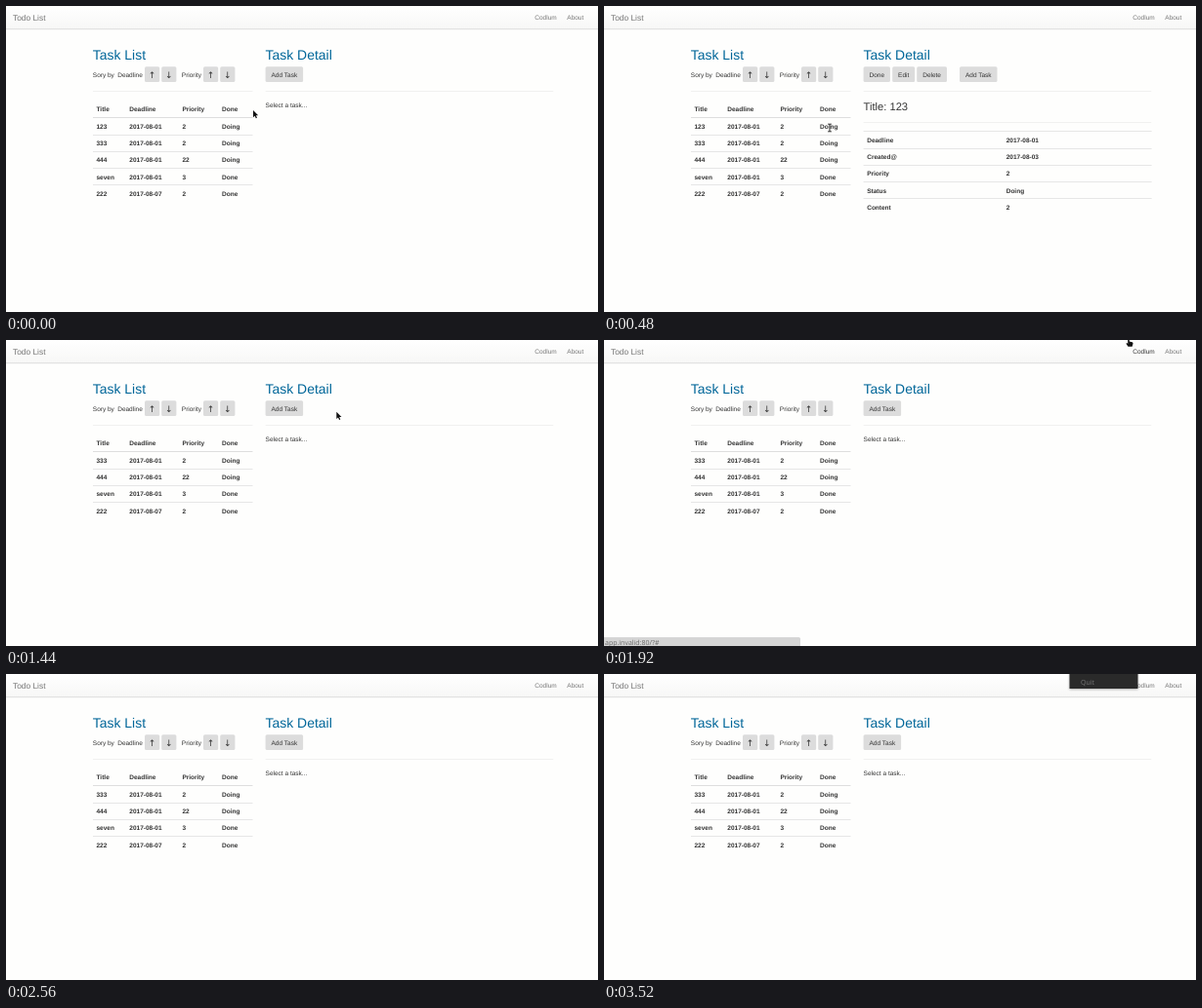
An HTML page that plays this animation: 606 by 314 pixels, repeating every 3.68 s.

```html
<!DOCTYPE html>
<html lang="en">
<head>
<meta charset="utf-8">
<title>Todo List</title>
<style>
  html, body { margin: 0; width: 100%; height: 100%; overflow: hidden; background: #fefefd; }
  svg { display: block; width: 606px; height: 314px; }
  text { font: 6.51px "Liberation Sans", Arial, sans-serif; fill: #333; text-rendering: geometricPrecision; }
  .bold { font-weight: bold; }
  .h2 { font-size: 13.95px; fill: #069; }
  .h3 { font-size: 11.16px; }
  .brand { font-size: 8.37px; fill: #777; }
  .nav { fill: #777; }
  .nav.hover { fill: #333; }
  .button { text-anchor: middle; }
  .arrow { text-anchor: middle; font: 9px "DejaVu Sans", sans-serif; }
  .status { font: 7px "Open Sans", sans-serif; fill: #666; }
  .quit { font: 7px "Open Sans", sans-serif; }
  .cursor { fill: #111; stroke: #fff; stroke-width: .7; stroke-linejoin: round; paint-order: stroke; }
</style>
</head>
<body>
<svg viewBox="0 0 606 314" xmlns="http://www.w3.org/2000/svg">
  <defs>
    <linearGradient id="bar" x2="0" y2="1">
      <stop stop-color="#fff"/><stop offset="1" stop-color="#f7f7f6"/>
    </linearGradient>
    <linearGradient id="press" x2="0" y2="1">
      <stop stop-color="#bdbdbd"/><stop offset=".3" stop-color="#d3d3d3"/>
    </linearGradient>
    <filter id="shadow" x="-20%" y="-20%" width="140%" height="160%">
      <feDropShadow dx="0" dy="1" stdDeviation="1.2" flood-opacity=".3"/>
    </filter>
  </defs>
  <g id="page"></g>
  <g id="listBefore"></g>
  <g id="listAfter"></g>
  <g id="empty"></g>
  <g id="detail"></g>
  <g id="status"></g>
  <g id="menu"></g>
  <path id="arrow" class="cursor" d="M0 0V7.3L1.7 5.8L2.8 8.2L4 7.7L2.9 5.3H5.2Z"/>
  <path id="beam" class="cursor" d="M-2 0H2V.8H.45V7.7H2V8.5H-2V7.7H-.45V.8H-2Z"/>
  <path id="hand" class="cursor" d="M-.8 .2Q0 -.6 .8 .2V2.6L3.8 3.2Q4.7 3.5 4.5 4.7L3.7 7.8H-.5L-2.4 5Q-2.5 4 -1.6 4.1L-.8 4.9Z"/>
</svg>
<script>
const LOOP = 3680;
const ROW = 17.2;
const $ = id => document.getElementById(id);

function add(parent, tag, attrs, content = '') {
  const node = document.createElementNS('http://www.w3.org/2000/svg', tag);
  for (const key in attrs) node.setAttribute(key, attrs[key]);
  node.textContent = content;
  return parent.appendChild(node);
}
const text = (parent, x, y, content, cls = '') => add(parent, 'text', { x, y, class: cls }, content);
const rect = (parent, x, y, width, height, fill, more = {}) =>
  add(parent, 'rect', { x, y, width, height, fill, ...more });
const rule = (parent, x, y, width, fill = '#e6e6e6') => rect(parent, x, Math.round(y), width, 1, fill);

function button(parent, x, width, label, isArrow = false) {
  const box = rect(parent, x, 62.3, width, 15.7, '#dcdcdc', { rx: 1.5 });
  text(parent, x + width / 2, isArrow ? 74 : 72.6, label, isArrow ? 'arrow' : 'button');
  return box;
}

function taskTable(parent, tasks) {
  tasks.forEach((task, i) => {
    if (i) rule(parent, 89, 114.3 + i * ROW, 163.5);
    [92.5, 126.3, 180.4, 221].forEach((x, c) => text(parent, x, 125.9 + i * ROW, task[c], 'bold'));
  });
}

const page = $('page');
rect(page, 0, 0, 606, 24, 'url(#bar)');
rect(page, 0, 23, 606, 1, '#e2e2e2');
rect(page, 0, 24, 606, 1, '#f7f7f6');
text(page, 7, 14.6, 'Todo List', 'brand');
const link = text(page, 541.3, 14, 'Codlum', 'nav');
text(page, 574.3, 14, 'About', 'nav');
text(page, 88.8, 55, 'Task List', 'h2');
text(page, 265.6, 55, 'Task Detail', 'h2');
text(page, 88.8, 72.5, 'Sory by');
text(page, 114.2, 72.5, 'Deadline');
text(page, 179.8, 72.5, 'Priority');
[142, 202].forEach(x => {
  button(page, x, 15.2, '↑', true);
  button(page, x + 17.2, 15.2, '↓', true);
});
rule(page, 89, 87, 163.5, '#f1f1f0');
rule(page, 265.6, 87, 294.6, '#f1f1f0');
['Title', 'Deadline', 'Priority', 'Done'].forEach((label, c) =>
  text(page, [92.5, 126.3, 180.4, 221][c], 108, label, 'bold'));
rule(page, 89, 114, 163.5, '#dedede');

const tasks = [
  ['123', '2017-08-01', '2', 'Doing'],
  ['333', '2017-08-01', '2', 'Doing'],
  ['444', '2017-08-01', '22', 'Doing'],
  ['seven', '2017-08-01', '3', 'Done'],
  ['222', '2017-08-07', '2', 'Done'],
];
taskTable($('listBefore'), tasks);
taskTable($('listAfter'), tasks.slice(1));

button($('empty'), 265.6, 38.5, 'Add Task');
text($('empty'), 265.6, 104.3, 'Select a task...');

const detail = $('detail');
button(detail, 265.6, 27.3, 'Done');
button(detail, 295.2, 23, 'Edit');
const deleteBox = button(detail, 320.2, 30.8, 'Delete');
button(detail, 364, 38.5, 'Add Task');
text(detail, 265.6, 107.2, 'Title: 123', 'h3');
rule(detail, 265.6, 119, 294.6, '#f1f1f0');
[['Deadline', '2017-08-01'], ['Created@', '2017-08-03'], ['Priority', '2'], ['Status', 'Doing'], ['Content', '2']]
  .forEach(([label, value], i) => {
    rule(detail, 265.6, 128.3 + i * ROW, 295);
    text(detail, 269.2, 139.9 + i * ROW, label, 'bold');
    text(detail, 411.7, 139.9 + i * ROW, value, 'bold');
  });

rect($('status'), -2, 305, 203, 12, '#d5d5d5', { rx: 1.5 });
text($('status'), 1, 312.6, 'app.invalid:80/?#', 'status');

const menuBox = rect($('menu'), 476.5, -3, 70, 18, '#2c2c2c', { filter: 'url(#shadow)' });
const quit = text($('menu'), 488, 11.4, 'Quit', 'quit');

// [start, cursor, x, y]
const moves = [
  [0, 'arrow', 253, 107],
  [160, 'beam', 235, 119.5],
  [320, 'beam', 231, 120.7],
  [640, 'beam', 312, 91],
  [800, 'arrow', 338.3, 73.8],
  [960, 'hand', 339, 73],
  [1440, 'arrow', 338.3, 73.8],
  [1760, 'hand', 538, 0],
  [1920, 'hand', 537, -1],
  [2080, 'arrow', 446.7, 21.3],
  [2240, 'arrow', 315, 68],
  [2400, 'arrow', 316.3, 66],
  [2560, 'none', 0, 0],
];

function draw(now) {
  const t = now % LOOP;
  const during = (from, to) => t >= from && t < to;
  const show = (id, on) => $(id).setAttribute('visibility', on ? 'visible' : 'hidden');

  const open = during(480, 1440);
  show('detail', open);
  show('empty', !open);
  show('listBefore', t < 1440);
  show('listAfter', t >= 1440);
  show('status', during(1920, 2400));
  show('menu', t >= 3200);

  const pressed = during(1280, 1440);
  deleteBox.setAttribute('fill', pressed ? 'url(#press)' : '#dcdcdc');
  deleteBox.setAttribute('stroke', pressed ? '#8f8f8f' : 'none');
  deleteBox.setAttribute('stroke-width', .8);
  link.classList.toggle('hover', during(1760, 2080));
  $('status').setAttribute('opacity', t < 2240 ? 1 : .8);
  menuBox.setAttribute('fill', t < 3520 ? '#353535' : '#2c2c2c');
  quit.style.fill = t < 3520 ? '#d0d0d0' : '#777';

  const [, cursor, x, y] = moves.findLast(([start]) => start <= t);
  for (const id of ['arrow', 'beam', 'hand']) show(id, id === cursor);
  if (cursor !== 'none') $(cursor).setAttribute('transform', `translate(${x} ${y})`);
}

function tick() {
  draw(performance.now());
  requestAnimationFrame(tick);
}
tick();
</script>
</body>
</html>
```
